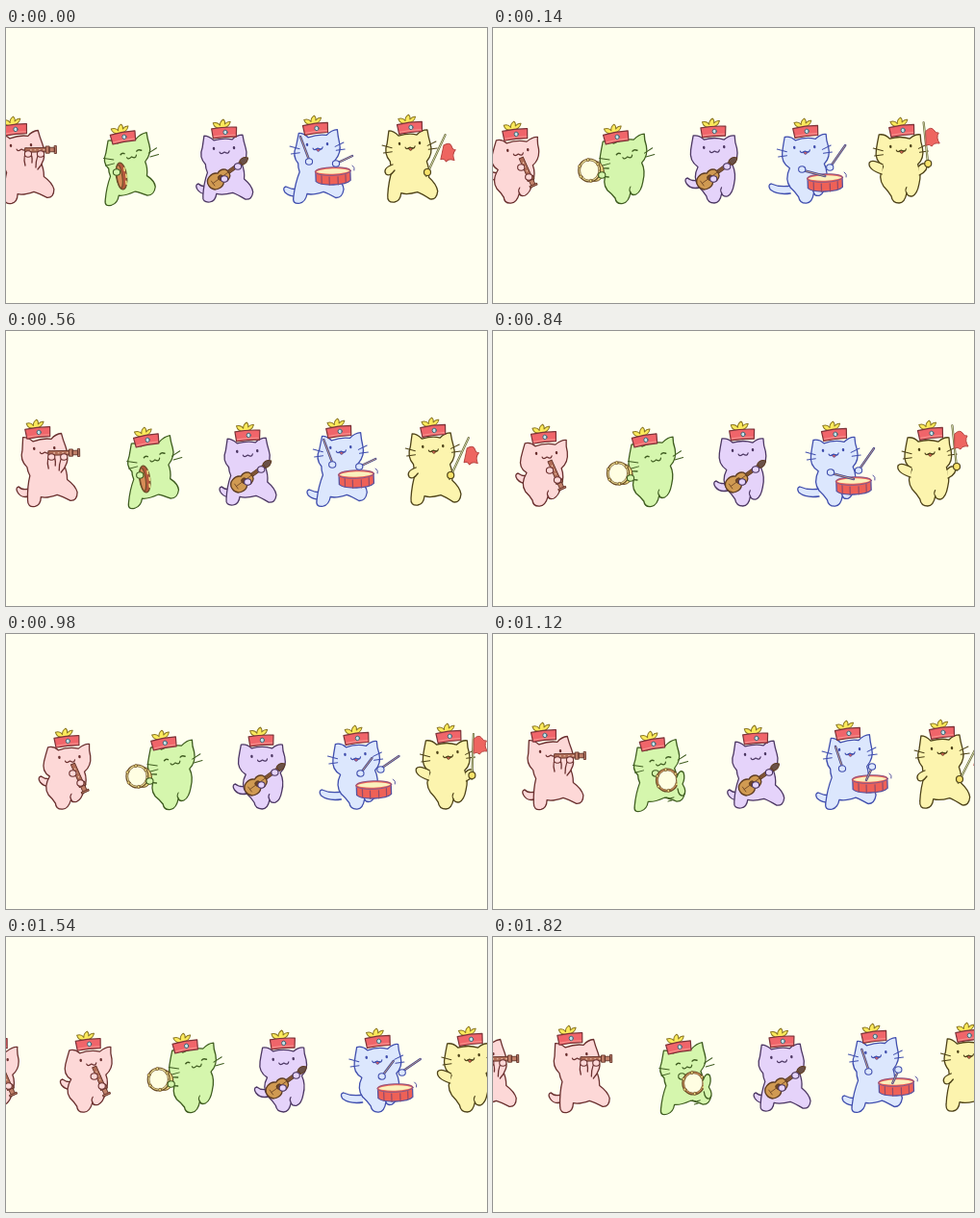
Recreate the animation shown at these times as an HTML page. Size 500 by 286 pixels, loop 1960 ms.

```html
<!DOCTYPE html>
<html lang="en">
<head>
<meta charset="utf-8">
<title>Marching cat band</title>
<style>
html, body { margin: 0; width: 100%; height: 100%; overflow: hidden; background: #fffff0; }
svg { display: block; width: 100vw; height: 100vh; }
</style>
</head>
<body>
<svg id="stage" viewBox="0 0 500 286" stroke-linecap="round" stroke-linejoin="round"></svg>
<script>
const STEP = 140, COUNT = 14;
const stage = document.getElementById('stage');

// Poses: 0 stride, 1 hop, 2 hop back, 3 stride back
const ORDER = [0, 1, 2, 3, 0, 0, 1, 2, 3, 0, 1, 2, 3, 3];
const POSE_STEP = [0, 6, 2, 8];
const travel = i => 6.2 * i - 0.035 * i * i;

const STRIDE = 'M-21 109Q-16 109-11 114Q0 111 8 113Q13 108 19 108Q20 115 22 122Q25 132 18 140Q21 148 20 156' +
  'Q28 163 29 170Q28 179 21 178Q13 173 8 171Q-3 174-9 172Q-10 180-16 181Q-24 182-23 174Q-22 160-18 149Q-20 144-20 140Q-27 132-23 122Z';
const HOP = 'M-22 113Q-16 112-11 117Q0 114 10 117Q16 112 21 113Q21 120 23 126Q25 137 18 143Q22 152 19 163' +
  'Q17 173 12 175Q7 176 6 172Q4 182-2 182Q-9 182-10 175Q-13 170-18 165Q-24 156-18 145Q-27 139-25 128Q-24 122-22 113Z';

// hat: [x, y] per pose; lean, sway: head and foot shift for stride and hop; tip: sideways slope
const CATS = [
  { fill: '#fdd8d7', ink: '#6a302f', hat: [[9, 106], [53, 111], [34, 112], [53, 106]],
    lean: [6, 2], sway: [8, -5], tip: -.08, rise: 0, look: 1, tilt: -6, tail: [9, 12], tailY: [0, -14], play: flute },
  { fill: '#d5f6ad', ink: '#3f5c20', hat: [[122, 114], [158, 114], [135, 114], [166, 115]],
    lean: [5, 8], sway: [-1, 1], tip: -.19, rise: 4, look: 3, tilt: -10, whiskers: true, sleepy: true, play: tambourine },
  { fill: '#e5d3fa', ink: '#4c3763', hat: [[227, 109], [259, 108], [236, 111], [273, 109]],
    lean: [0, 1], sway: [1, 2], tip: 0, rise: 0, look: 0, tilt: -4, tail: [10, 11], tailY: [0, -6], play: guitar },
  { fill: '#dce7fd', ink: '#414fae', hat: [[322, 105], [355, 108], [335, 109], [369, 104]],
    lean: [3, 0], sway: [-4, 3], tip: -.07, rise: 0, look: -1, tilt: -7, tail: [17, 19], tailY: [3, 0], whiskers: true, open: true, play: drum },
  { fill: '#fcf4ae', ink: '#4e4319', hat: [[420, 104], [455, 107], [431, 107], [467, 103]],
    lean: [-1, -2], sway: [1, 1], tip: 0, rise: 0, look: 1, tilt: -7, whiskers: true, open: true, play: flag }
];

const path = (d, fill, ink, w = 1.3) => `<path d="${d}" fill="${fill}" stroke="${ink}" stroke-width="${w}"/>`;
const line = (d, ink, w) => path(d, 'none', ink, w);
const oval = (x, y, rx, ry, fill, ink, w = 1.2) =>
  `<ellipse cx="${x}" cy="${y}" rx="${rx}" ry="${ry}" fill="${fill}" stroke="${ink}" stroke-width="${w}"/>`;
const place = (x, y, turn, art, size = 1) =>
  `<g transform="translate(${x} ${y}) rotate(${turn}) scale(${size})">${art}</g>`;
const paw = (c, x, y) => oval(x, y, 3.6, 3.2, c.fill, c.ink, 1.1);
const isHop = p => p === 1 || p === 2;

function flute(c, p) {
  const ink = '#633329';
  const pipe = path('M0-2.5H25V2.5H0Z', '#b06c56', ink, 1) +
    path('M24-4H28V4H24ZM28-2.5H34V2.5H28ZM34-4.5H36V4.5H34Z', '#c08069', ink, 1) +
    line('M6 0H7M11 0H12M16 0H17M21 0H22', '#f0c8b0', 1.2);
  if (isHop(p)) return place(6, 135, 66, pipe, .9) + paw(c, 6, 145) + paw(c, 14, 155);
  return path('M11 143Q8 131 14 129Q19 131 18 140M22 145Q22 132 28 129Q32 131 30 137Q28 143 24 147', c.fill, c.ink) +
    place(11, 127, -1, pipe, .9) + paw(c, 14, 131) + paw(c, 27, 131);
}

function tambourine(c, p) {
  const gold = '#eedb82', ink = '#6b4d28';
  if (p === 0) {
    return place(-2, 154, -8, oval(0, 0, 5.5, 14, '#b5573c', ink) + oval(-2, 0, 2.8, 12, '#d88c57', ink, 1) +
      line('M4-8V-5M5-1V2M4 6V9', gold, 1.6)) + paw(c, -7, 150);
  }
  const bells = [0, 1, 2, 3, 4, 5].map(k => {
    const a = k * Math.PI / 3 + 0.4;
    return oval((11 * Math.cos(a)).toFixed(1), (11 * Math.sin(a)).toFixed(1), 1.5, 1.5, gold, ink, 0.7);
  }).join('');
  const face = rim => oval(0, 0, 11.5, 12, rim, ink) + oval(0, 0, 9.7, 10.2, '#fffee2', ink, 0.7);
  if (p === 3) {
    return paw(c, 3, 145) + place(15, 152, 0, face('#cf9058') + bells) +
      path('M25 149Q28 140 32 144Q34 150 31 156Q36 164 32 168Q27 169 26 161', c.fill, c.ink) +
      line('M14 170Q18 172 22 170M16 174L20 173', c.ink, 1);
  }
  return path('M-8 146Q-17 145-18 149Q-17 155-8 155', c.fill, c.ink) +
    place(-28, 148, 0, oval(6, 1, 9, 10.5, gold, ink, 1) + face('#f0e294') + bells) + paw(c, -15, 153);
}

function guitar(c, p) {
  const ink = '#5c3b22';
  const art = path('M8-1.7H31V1.7H8Z', '#8f6040', ink, 1) +
    path('M30-2.6Q36-5 39 0Q36 4 30 2.6Z', '#6b5148', ink, 1) +
    path('M-11 0C-11-9 0-10 4-5.5Q9-8 13-4Q15 0 13 4Q9 8 4 5.5C0 10-11 9-11 0Z', '#d09a52', ink) +
    oval(4, 0, 2.8, 2.8, '#704625', ink, 0.8) + line('M-6-3V3M-6 0H30', '#704625', 0.8);
  return place(-7, 158, -36, art) + paw(c, 0, 157) + paw(c, 14, 144);
}

function drum(c, p) {
  const red = '#ee6157', ink = '#5653a0';
  const [x, y] = [[18, 154], [20, 161], [18, 162], [23, 156]][p];
  const sticks = ['M-16 113L-7 137M21 141L38 133', 'M-3 148L20 154M25 145L41 122',
    'M4 145L16 129M25 140L44 127', 'M-13 117L-6 138M19 152L26 137'][p];
  const hands = [[-7, 139, 21, 141], [-4, 147, 25, 145], [4, 145, 25, 141], [-6, 140, 25, 138]][p];
  const art = path('M-18-5V5Q-14 9 0 9Q14 9 18 5V-5Z', red, ink) +
    line('M-12-1V7M-4 1V9M5 1V9M13-1V7', '#8e4b6c', 1.2) +
    oval(0, -5, 18, 3.6, '#faf0bd', red, 1.8) + oval(0, -5, 18.6, 4.3, 'none', ink, 0.7);
  return place(x, y, -2, art) + line(sticks, '#454690', 2.4) + line(sticks, '#b99a86', 1) +
    paw(c, hands[0], hands[1]) + paw(c, hands[2], hands[3]) +
    line(`M${x + 20} ${y - 11}q3 2 2 5`, ink, 1);
}

function flag(c, p) {
  const hop = isHop(p);
  const [x, y, turn] = [[18, 151, 25], [27, 142, -6], [24, 148, 2], [18, 152, 27]][p];
  const cloth = path('M0 0Q5-5 8-1Q10 3 13 2Q10 7 14 13Q8 12 6 16Q3 13 0 15Z', '#ee6560', '#b64542', 1);
  const arm = hop
    ? path('M-20 142Q-31 136-34 140Q-36 147-21 152', c.fill, c.ink) + path('M17 144Q22 139 25 142Q28 148 18 153', c.fill, c.ink)
    : path('M-18 142Q-29 146-25 152Q-21 155-16 148', c.fill, c.ink);
  const at = [[35, 122], [25, 107], [26, 109], [36, 122]][p];
  return arm + place(x, y, turn, line('M0 3V-44', '#5f5c30', 2.2) + line('M0 3V-44', '#d3dcac', 0.9)) +
    place(at[0], at[1], hop ? 0 : 12, cloth) +
    oval(x, y - 1, 3.5, 3.5, '#f8e36a', c.ink);
}

function hat(x, y, tilt) {
  const ink = '#7c3338';
  return place(x, y, tilt,
    path('M-3-5Q-10-5-11-11Q-6-12-4-8Q-4-12 0-14Q2-12 1-9Q4-12 7-11Q5-5-3-5Z', '#fbea5c', '#8a7622', 1) +
    path('M-13-5Q0-6.5 13-5L12 5Q0 4-12 5Z', '#f0656a', ink, 1.2) +
    line('M-11 3Q0 2 11 3', '#f8a09a', 0.8) + oval(1, -.5, 2.1, 2.3, '#c3e4ea', '#3f6170', 0.9));
}

function face(c, x, y) {
  const eyes = c.sleepy ? 'M-11 0Q-9-2-7-.5M6-1Q8-3 11-1' : 'M-11-.4V.4M10-.4V.4';
  let art = line(eyes, c.ink, c.sleepy ? 1.5 : 2.4);
  if (c.open) art += path('M-2 5Q0 10 3 5Z', '#e2645a', c.ink, 0.8);
  art += line('M-5 4Q-4 7 0 4Q4 7 5 3', c.ink, 1.2);
  if (c.whiskers) art += line('M-19 4L-29 1M-19 8L-28 9M18 3L27-1M19 7L28 6', c.ink, 1);
  return place(x, y, c.sleepy ? -9 : -2, art);
}

function body(c, k, y) {
  const floor = k ? 182 : 181, top = k ? 115 : 112;
  const sy = (floor - y + c.rise - 6) / (floor - top);
  const slide = c.sway[k] / 75;
  const x0 = c.lean[k] - slide * 115;
  return `<g transform="matrix(1 ${c.tip} ${slide} ${sy} ${x0} ${floor * (1 - sy)})">` +
    path(k ? HOP : STRIDE, c.fill, c.ink) + (k ? line('M6 172Q4 169 6 166', c.ink, 1.1) : '') + '</g>';
}

function cat(c, p, x) {
  const k = isHop(p) ? 1 : 0, y = c.hat[p][1], lean = c.lean[k];
  let art = '';
  if (c.tail) {
    const t = c.tail[k];
    art += place(lean - 18, 167 + c.tailY[k], 0,
      path(`M2 5Q${-t * .6} 7 ${-t} 1Q${-t - 3}-4 ${-t + 1}-5Q${-t * .5}-1 3-3`, c.fill, c.ink));
  }
  art += body(c, k, y) + face(c, lean + c.look, y + 16) + hat(0, y, c.tilt) + c.play(c, p);
  return place(x, 0, 0, art);
}

function draw(i) {
  const p = ORDER[i], shift = travel(i) - travel(POSE_STEP[p]);
  let art = '<rect width="500" height="286" fill="#fffff0"/>';
  if (i > 8) art += cat(CATS[0], p, CATS[0].hat[p][0] + shift - 97);
  for (const c of CATS) art += cat(c, p, c.hat[p][0] + shift);
  stage.innerHTML = art;
}

let shown = -1;
const start = performance.now();
function tick() {
  const i = Math.floor((performance.now() - start) / STEP) % COUNT;
  if (i !== shown) draw(shown = i);
  requestAnimationFrame(tick);
}
tick();
</script>
</body>
</html>
```
